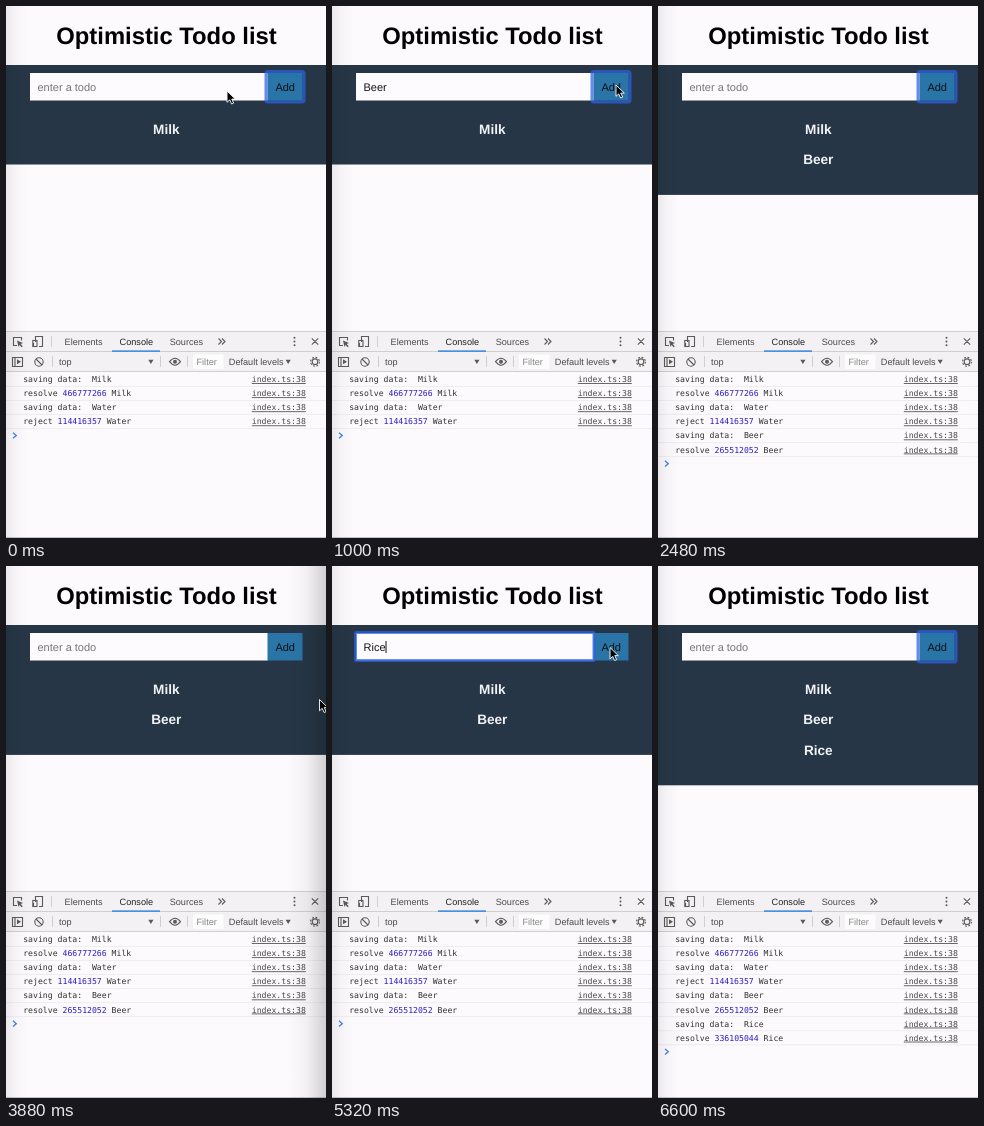
An HTML page for the animation above (6640 ms loop, 320x532 px).

```html
<!DOCTYPE html>
<html lang="en">
<head>
<meta charset="utf-8">
<title>Optimistic Todo list</title>
<style>
html, body { margin: 0; width: 100%; height: 100%; overflow: hidden; background: #fcfafc; }
svg { display: block; width: 100%; height: 100%; }
text { font-family: "Liberation Sans", Arial, sans-serif; text-rendering: geometricPrecision; white-space: pre; }
.title { font-size: 23.8px; font-weight: 700; text-anchor: middle; }
.item { font-size: 13.6px; font-weight: 700; text-anchor: middle; fill: #f1f2f4; }
.field { font-size: 11px; }
.ui { font-size: 9.15px; fill: #4c4c4c; }
.log { font-family: "DejaVu Sans Mono", monospace; font-size: 8.17px; fill: #303030; }
.num { fill: #2a1cc4; }
.link { fill: #484848; text-decoration: underline; }
.ring { fill: none; stroke: #2c62e6; stroke-width: 3; stroke-opacity: .72; }
.icon { fill: none; stroke: #5a5a5a; stroke-width: 1.1; }
.solid { fill: #5a5a5a; }
.sep { stroke: #cfcfcf; stroke-width: 1; }
.row { stroke: #efedef; stroke-width: 1; }
</style>
</head>
<body>
<svg viewBox="0 0 320 532" preserveAspectRatio="none">
  <defs>
    <linearGradient id="left">
      <stop offset="0" stop-opacity=".07"/><stop offset=".4" stop-opacity=".025"/><stop offset="1" stop-opacity="0"/>
    </linearGradient>
    <linearGradient id="right">
      <stop offset="0" stop-opacity="0"/><stop offset=".5" stop-opacity=".04"/><stop offset="1" stop-opacity=".17"/>
    </linearGradient>
  </defs>
  <rect width="320" height="532" fill="#fcfafc"/>
  <text class="title" x="160.5" y="38">Optimistic Todo list</text>

  <rect id="panel" y="59" width="320" height="99.5" fill="#263646"/>
  <rect x="24" y="67" width="238" height="27.5" fill="#fdfbfd"/>
  <rect x="261.5" y="67" width="35" height="27.5" fill="#2a75a8"/>
  <text id="value" class="field" x="31.5" y="85"></text>
  <path id="caret" d="M0 75V87" stroke="#111" stroke-width="1"/>
  <text class="field" x="269.4" y="85" fill="#0a0f14">Add</text>
  <rect id="ringInput" class="ring" x="23.5" y="66.5" width="238.5" height="28" rx="1"/>
  <rect id="ringAdd" class="ring" x="260" y="65.5" width="38" height="30.5" rx="2"/>
  <g id="items"></g>

  <rect y="325" width="320" height="40.5" fill="#f3f1f3"/>
  <path class="sep" d="M0 325.5H320M0 345.5H320M0 365.5H320M45.5 330V341M46.5 350V361M154.5 350V361M181.5 350V361"/>
  <rect x="106" y="344.3" width="48" height="1.7" fill="#4a90e2"/>
  <text class="ui" x="58.6" y="339">Elements</text>
  <text class="ui" x="113.6" y="339" style="fill:#222">Console</text>
  <text class="ui" x="163.7" y="339">Sources</text>
  <path class="icon" d="M11 339.5H7.5V331.5H15.5V334.5M30 340.5H27.5V337M29.5 336V330.5H36.5V340.5H33M212.5 332.5l3 3l-3 3M216 332.5l3 3l-3 3M305.8 332.3l6.4 6.4M312.2 332.3l-6.4 6.4"/>
  <path class="solid" d="M11 334.5l6 2.5l-2.3 1l2 2.2l-1 1l-2.2-2.2l-1 2z"/>
  <rect class="icon" x="26.8" y="334.5" width="4.2" height="6"/>
  <g class="solid">
    <circle cx="288.5" cy="331.7" r="1"/><circle cx="288.5" cy="335.5" r="1"/><circle cx="288.5" cy="339.3" r="1"/>
    <path d="M11 353.3l4 2.5l-4 2.5zM142.3 353.7h5.2l-2.6 4.4zM279.6 353.7h5.2l-2.6 4.4z"/>
  </g>
  <path class="icon" d="M6.5 351.5H16.5V360.5H6.5ZM9 351.5V360.5M30 353l6 6M163.5 355.7q5.5-7 11 0q-5.5 7-11 0Z"/>
  <circle class="icon" cx="33" cy="356" r="4.2"/>
  <circle class="solid" cx="169" cy="355.7" r="2"/>
  <circle class="icon" cx="309" cy="355.7" r="2.8" stroke-width="1.8"/>
  <circle class="icon" cx="309" cy="355.7" r="4.4" stroke-dasharray="1.8 1.66"/>
  <text class="ui" x="53" y="359">top</text>
  <rect x="187" y="348.5" width="30.5" height="14.5" fill="#fdfcfd"/>
  <text class="ui" x="190.5" y="359" style="fill:#858585">Filter</text>
  <text class="ui" x="222.8" y="359">Default levels</text>

  <g id="logs"></g>
  <path id="prompt" d="M7 -2.8l3.3 2.8l-3.3 2.8" fill="none" stroke="#3b82e8" stroke-width="1.3"/>
  <path d="M0 531.5H320" stroke="#c4c3c4"/>
  <rect width="22" height="532" fill="url(#left)"/>
  <rect id="shade" x="282" width="38" height="532" fill="url(#right)"/>
  <path id="cursor" d="M0 0V11.3L2.7 8.9L4.6 13L6.6 12.1L4.8 8.1H8.3Z" fill="#060606" stroke="#fff" stroke-width=".9" stroke-linejoin="round"/>
</svg>
<script>
const LOOP = 6640, STEP = 40;
const $ = id => document.getElementById(id);

const focusSteps = [[0, 'add'], [120, 'input'], [960, 'add'], [2600, ''], [4200, 'add'], [4640, 'input'], [5400, 'add']];
const textSteps = [[0, ''], [360, 'B'], [560, 'Be'], [640, 'Bee'], [720, 'Beer'], [1080, ''],
  [4880, 'R'], [4960, 'Ri'], [5120, 'Ric'], [5160, 'Rice'], [5680, '']];
const itemSteps = [[0, 1], [1080, 2], [5680, 3]];
const logSteps = [[0, 4], [1080, 5], [1160, 6], [5680, 7], [6120, 8]];

// Each path is a list of [time, x, y]; the pointer is hidden between paths.
const paths = [
  [[0, 221, 85], [80, 218, 81], [120, 218, 80], [200, 264, 74], [360, 264, 74]],
  [[760, 264, 74], [920, 284, 79], [1040, 284, 79], [1200, 324, 92]],
  [[3880, 313.5, 133.5], [4120, 236, 101], [4280, 216, 88], [4440, 216, 88], [4560, 211, 78], [4640, 211, 78], [4720, 214, 79], [4880, 214, 79]],
  [[5200, 240, 80], [5320, 278, 81.5], [5400, 282, 80], [5760, 282, 80], [6000, 324, 94]]
];
const shadeSteps = [[0, 0], [2440, 0], [2880, 1], [4040, 1], [4280, 0], [LOOP, 0]];

const data = [['saving', 'Milk'], ['resolve', 'Milk', 466777266], ['saving', 'Water'], ['reject', 'Water', 114416357],
  ['saving', 'Beer'], ['resolve', 'Beer', 265512052], ['saving', 'Rice'], ['resolve', 'Rice', 336105044]];
const rowY = i => 373.3 + i * 14.06;

$('logs').innerHTML = data.map(([verb, name, id], i) => {
  const y = rowY(i);
  const msg = id ? `${verb} <tspan class="num">${id}</tspan> ${name}` : `${verb} data:  ${name}`;
  return `<g><text class="log" x="17.2" y="${y + 2.9}">${msg}</text>` +
    `<text class="log link" x="245.8" y="${y + 2.9}">index.ts:38</text>` +
    `<path class="row" d="M0 ${y + 7.1}H320"/></g>`;
}).join('');
$('items').innerHTML = ['Milk', 'Beer', 'Rice']
  .map((name, i) => `<text class="item" x="160.3" y="${128 + i * 30.4}">${name}</text>`).join('');

const at = (steps, t) => steps.filter(s => s[0] <= t).pop()[1];

function mix(keys, t, k) {
  const i = Math.max(1, keys.findIndex(key => key[0] >= t));
  const a = keys[i - 1], b = keys[i];
  const p = (t - a[0]) / (b[0] - a[0]);
  return a[k] + (b[k] - a[k]) * p * p * (3 - 2 * p);
}

const show = (el, on) => el.style.visibility = on ? 'visible' : 'hidden';
const showFirst = (group, n) => [...group.children].forEach((el, i) => show(el, i < n));

function draw(t) {
  const focus = at(focusSteps, t), text = at(textSteps, t);
  const items = at(itemSteps, t), logs = at(logSteps, t);

  $('value').textContent = text || 'enter a todo';
  $('value').setAttribute('fill', text ? '#151515' : '#777');
  const caretX = 32 + (text ? $('value').getComputedTextLength() : 0);
  $('caret').setAttribute('transform', `translate(${caretX})`);
  show($('caret'), focus === 'input');
  show($('ringInput'), focus === 'input');
  show($('ringAdd'), focus === 'add');

  $('panel').setAttribute('height', 99.5 + (items - 1) * 30.4);
  showFirst($('items'), items);
  showFirst($('logs'), logs);
  $('prompt').setAttribute('transform', `translate(0 ${rowY(logs)})`);
  $('shade').setAttribute('opacity', mix(shadeSteps, t, 1));

  const path = paths.find(p => t >= p[0][0] && t < p[p.length - 1][0]);
  show($('cursor'), path);
  if (path) $('cursor').setAttribute('transform', `translate(${mix(path, t, 1)} ${mix(path, t, 2)})`);
}

const start = performance.now();
function tick() {
  const t = (performance.now() - start) % LOOP;
  draw(Math.floor(t / STEP) * STEP);
  requestAnimationFrame(tick);
}
tick();
</script>
</body>
</html>
```
